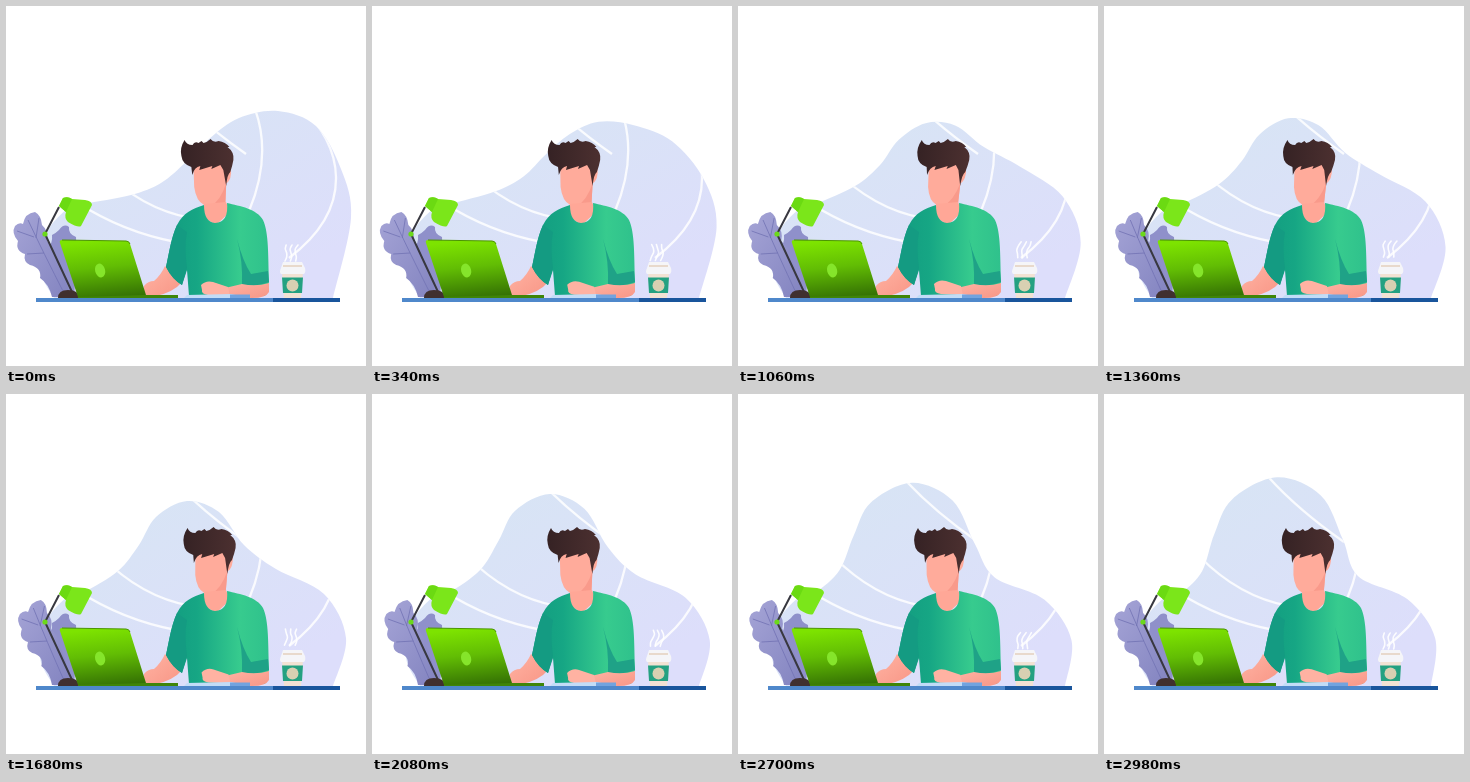
These frames come from a looping animation (360x360 px, 3000 ms). An HTML page:

```html
<!DOCTYPE html>
<html lang="en">
<head>
<meta charset="utf-8">
<title>Working at a desk</title>
<style>
html, body { margin: 0; width: 100%; height: 100%; overflow: hidden; background: #fff; }
svg { display: block; width: 100vw; height: 100vh; }
</style>
</head>
<body>
<svg viewBox="0 0 360 360">
  <defs>
    <linearGradient id="sky" x1="0" y1="0" x2="1" y2="1">
      <stop offset=".2" stop-color="#d8e4f5"/><stop offset=".85" stop-color="#dddefb"/>
    </linearGradient>
    <linearGradient id="leafFill" x1="0" y1="0" x2="1" y2="1">
      <stop offset="0" stop-color="#a5a4d6"/><stop offset="1" stop-color="#8384c0"/>
    </linearGradient>
    <linearGradient id="lid" x1=".6" y1="0" x2=".75" y2="1">
      <stop offset="0" stop-color="#7de300"/><stop offset=".45" stop-color="#62bd04"/><stop offset="1" stop-color="#347004"/>
    </linearGradient>
    <linearGradient id="shirt">
      <stop offset="0" stop-color="#129c80"/><stop offset=".3" stop-color="#16a684"/><stop offset=".72" stop-color="#37cb8e"/><stop offset="1" stop-color="#2fc18c"/>
    </linearGradient>
    <linearGradient id="skin" x1="0" y1="0" x2="1" y2="1">
      <stop offset="0" stop-color="#ffb3a3"/><stop offset="1" stop-color="#f89686"/>
    </linearGradient>
    <linearGradient id="hairFill">
      <stop offset="0" stop-color="#352224"/><stop offset="1" stop-color="#4c3030"/>
    </linearGradient>
    <clipPath id="clip"><path id="clipBlob"/></clipPath>
  </defs>

  <path id="blob" fill="url(#sky)"/>
  <path clip-path="url(#clip)" fill="none" stroke="#fff" stroke-opacity=".85" stroke-width="2.3"
    d="M95 162Q135 203 185 212M72 197Q117 226 170 236M160 78Q190 113 240 148
      M249 103Q266 150 243 205M296 102C335 138 352 200 283 252"/>

  <path fill="#8f90ca" d="M60 291Q44 262 41 243Q47 238 46 229Q50 227 53 224Q58 217 63 221Q62 228 70 231Q71 239 66 246Q71 262 68 291Z"/>
  <g id="leaf">
    <path fill="url(#leafFill)" d="M64 291H46Q43 278 34 272Q36 262 24 259Q17 256 19 248Q9 245 12 235Q5 227 9 220Q13 216 17 218
      Q19 207 29 206Q35 209 36 219Q43 225 41 235Q49 242 49 248Q60 266 64 291Z"/>
    <path d="M22 214Q36 244 60 291M11 225L28 231M21 248L38 247M33 212L30 232" fill="none" stroke="#7273b4" stroke-width=".8"/>
  </g>

  <path d="M67 288L39 228L53 201" fill="none" stroke="#383840" stroke-width="2"/>
  <path d="M52 292Q52 284 62 284Q73 284 73 292Z" fill="#40302f"/>
  <circle cx="39" cy="228" r="2.6" fill="#6bd91a"/>
  <path d="M53 200L57 192Q62 190 66 193L79 194Q86 195 86 199L75 220Q72 222 62 216Q58 212 60 206Z" fill="#7be61a"/>
  <path d="M53 200L57 192Q62 190 66 193L60 206Z" fill="#6bda12"/>

  <g id="head">
    <path d="M187 158L219 154Q227 162 224 172Q222 177 220 177L219 205H198V199Q190 195 188 181Z" fill="#ffab9b"/>
    <path d="M204 201Q215 194 220 177L219 206L203 207Z" fill="#f99a8b"/>
    <path fill="url(#hairFill)" d="M178 134Q180 139 186 139Q188 135 192 137L195 135L197 137Q201 136 204 133Q207 137 212 135Q219 136 223 141L221 141
      Q228 146 227 154Q226 160 224 166Q221 168 220 180L217 164L214 159L205 163L206 160L193 164L194 160Q188 161 186 169L185 161Q176 158 175 150Q173 142 178 134Z"/>
  </g>

  <path d="M198 198L220 196L224 206L210 219L197 211Z" fill="#ffa797"/>
  <path d="M159 260L176 276Q168 286 150 290H141Q137 288 138 280Q142 275 148 275Q155 269 159 260Z" fill="url(#skin)"/>
  <path fill="url(#shirt)" d="M198 199C186 203 178 206 171 219C165 232 163 248 160 261Q166 273 176 279L181 264L183 290H259L263 276
    C262 250 263 227 257 214C251 203 234 200 221 197Q223 216 209 217Q198 216 198 199Z"/>
  <path d="M171 219C165 232 163 248 160 261Q166 273 176 279L181 262Q178 240 181 226Z" fill="#149b82"/>
  <path d="M231 233Q237 256 245 268L262 265L263 276Q250 281 236 279Q237 255 231 233Z" fill="#1fa287"/>

  <path d="M219 282L236 278Q250 281 263 277V286Q260 292 246 292L218 291Z" fill="url(#skin)"/>
  <path id="hand" d="M195 279Q200 274 207 276L222 281L224 290L202 289Q195 288 196 284Z" fill="#ffb2a2"/>
  <path d="M181 289L225 288L244 292H178Z" fill="#c2dcf7"/>
  <path d="M224 288.500H244V292H224Z" fill="#72a3df"/>

  <path d="M72 289H172V292H72Z" fill="#3f8508"/>
  <path d="M56 234L120 235Q123 235 124 238L140 289L72 291L54 237Q53 234 56 234Z" fill="url(#lid)"/>
  <path d="M56 234L120 235Q123 235 124 238" fill="none" stroke="#4b9500"/>
  <ellipse cx="94" cy="264.500" rx="5" ry="7" transform="rotate(-15 94 264)" fill="#85e52b"/>

  <g id="steam" fill="none" stroke="#fff" stroke-opacity=".9" stroke-width="1.6" stroke-linecap="round">
    <path/><path/><path/>
  </g>
  <path d="M276 266H297L295 292H278Z" fill="#f2e2d3"/>
  <path d="M276 271.500H297L296 287H277Z" fill="#24a181"/>
  <circle cx="286.500" cy="279.500" r="6" fill="#d8d0b2"/>
  <path d="M277 256H296L299 262Q300 266 298 268H275Q273 266 275 262Z" fill="#f5f5f8"/>
  <path d="M277 260H296" stroke="#e8d9cc" stroke-width="2"/>

  <path d="M30 292H267V296H30Z" fill="#4f88cb"/>
  <path d="M267 292H334V296H267Z" fill="#19559c"/>
</svg>
<script>
const LOOP = 3000, MID = .56;
const $ = id => document.getElementById(id);

// Each ridge point: place at the start, at MID and at the end.
const ridge = [
  [[125,189], [112,177], [98,177]],
  [[155,177], [133,151], [110,140]],
  [[180,156], [150,123], [128,105]],
  [[203,133], [181,107], [173,83]],
  [[233,112], [213,118], [217,101]],
  [[272,105], [238,151], [239,145]],
  [[310,120], [270,175], [254,182]],
  [[335,163], [318,200], [303,205]],
  [[345,212], [340,244], [331,244]]
];

// Parabola through three values at u = 0, MID and 1.
function glide(a, b, c, u) {
  return a * (u - MID) * (u - 1) / MID
    + b * u * (1 - u) / (MID * (1 - MID))
    + c * u * (u - MID) / (1 - MID);
}

// Smooth open curve through points.
function spline(pts) {
  const pt = i => pts[Math.max(0, Math.min(pts.length - 1, i))];
  let d = "M" + pts[0];
  for (let i = 0; i < pts.length - 1; i++) {
    const [a, b, c, e] = [pt(i - 1), pt(i), pt(i + 1), pt(i + 2)];
    const c1 = b.map((v, j) => v + (c[j] - a[j]) / 6);
    const c2 = c.map((v, j) => v - (e[j] - b[j]) / 6);
    d += `C${c1} ${c2} ${c}`;
  }
  return d;
}

// Swings from 0 to 1 and back once per period.
const swing = (t, period) => (1 - Math.cos(2 * Math.PI * t / period)) / 2;

// Shears an element so that it moves by dx at the given height above its base.
function lean(id, dx, base, height) {
  const k = dx / height;
  $(id).setAttribute("transform", `matrix(1 0 ${-k} 1 ${k * base} 0)`);
}

function wisp(i, t) {
  const phase = 4 * Math.PI * t / LOOP;
  const bottom = 255 - 4 * swing(t, LOOP);
  return spline([0, 1, 2, 3, 4].map(k => [
    279 + i * 5 + k * .6 + (.8 + k * .3) * Math.sin(k * 1.4 + i * .5 - phase),
    bottom - k * 4
  ]));
}

function draw(t) {
  const crest = ridge.map(([a, b, c]) => a.map((v, j) => glide(v, b[j], c[j], t / LOOP)));
  const outline = spline([[48,292], [34,264], [40,228], [60,204], [78,198], ...crest, [327,292]]) + "Z";
  $("blob").setAttribute("d", outline);
  $("clipBlob").setAttribute("d", outline);

  const nod = swing(t, 2300);
  lean("leaf", 6 * swing(t, 4100), 291, 80);
  lean("head", .5 + 5 * nod, 207, 68);
  $("hand").setAttribute("transform", `translate(${nod} ${-nod})`);
  [...$("steam").children].forEach((el, i) => el.setAttribute("d", wisp(i, t)));
}

function frame() {
  draw(performance.now() % LOOP);
  requestAnimationFrame(frame);
}
frame();
</script>
</body>
</html>
```
